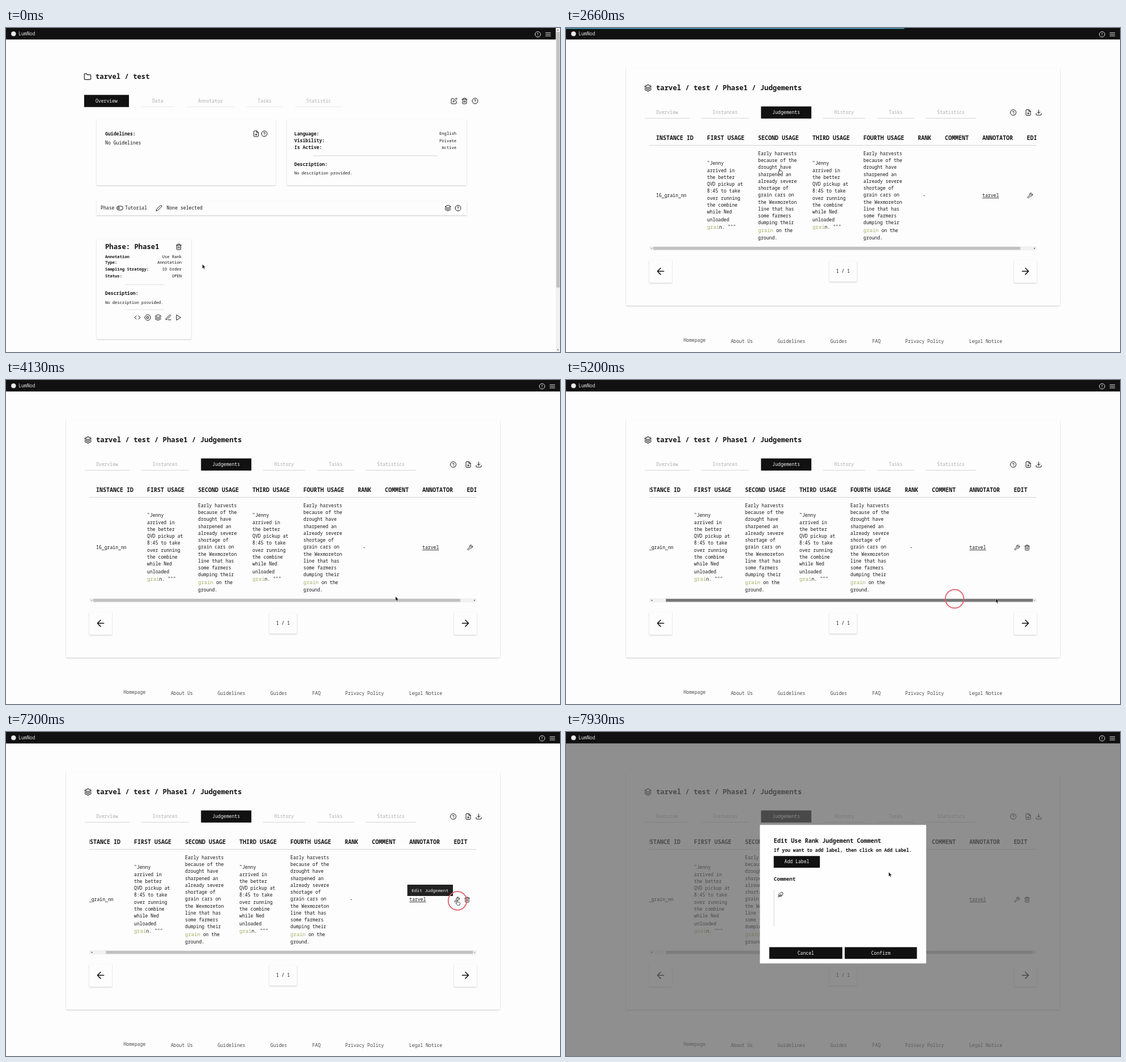
An HTML page that plays this animation: 978 px wide and 573 px high, repeating every 8 s.

```html
<!DOCTYPE html>
<html lang="en">
<head>
<meta charset="utf-8">
<title>Judgement editing</title>
<style>
html, body { margin: 0; width: 100%; height: 100%; overflow: hidden; background: #fdfdfd; }
svg { display: block; width: 978px; height: 573px; font-family: "Noto Sans Mono", "DejaVu Sans Mono", monospace; }
.card { fill: #fdfdfd; filter: drop-shadow(0 1.5px 1.2px #0003); }
.icon { fill: none; stroke-width: 2; stroke-linecap: round; stroke-linejoin: round; }
</style>
</head>
<body>
<svg id="stage" viewBox="0 0 978 573"></svg>
<script>
const INK = '#141414', DARK = '#111', PALE = '#f4f4f4', SMALL = 7.13, BASE = 8.15, MID = 10.2, BIG = 12.25;
const CIRCLE = 'M2 12a10 10 0 1 0 20 0a10 10 0 1 0-20 0';
const ICONS = {
  folder: 'M22 19a2 2 0 0 1-2 2H4a2 2 0 0 1-2-2V5a2 2 0 0 1 2-2h5l2 3h9a2 2 0 0 1 2 2z',
  layers: 'M12 2 2 7l10 5 10-5zM2 17l10 5 10-5M2 12l10 5 10-5',
  edit: 'M11 4H4a2 2 0 0 0-2 2v14a2 2 0 0 0 2 2h14a2 2 0 0 0 2-2v-7M18.5 2.5a2.1 2.1 0 0 1 3 3L12 15l-4 1 1-4z',
  trash: 'M3 6h18M19 6v14a2 2 0 0 1-2 2H7a2 2 0 0 1-2-2V6m3 0V4a2 2 0 0 1 2-2h4a2 2 0 0 1 2 2v2M10 11v6M14 11v6',
  help: CIRCLE + 'M9.1 9a3 3 0 0 1 5.8 1c0 2-3 3-3 3M12 17v.1',
  alert: CIRCLE + 'M12 7v5M12 16v.1',
  stop: CIRCLE + 'M9 9h6v6H9z',
  file: 'M14 2H6a2 2 0 0 0-2 2v16a2 2 0 0 0 2 2h12a2 2 0 0 0 2-2V8zM14 2v6h6M12 18v-6M9 15h6',
  menu: 'M3 12h18M3 6h18M3 18h18',
  download: 'M21 15v4a2 2 0 0 1-2 2H5a2 2 0 0 1-2-2v-4M7 10l5 5 5-5M12 15V3',
  code: 'M16 18l6-6-6-6M8 6l-6 6 6 6',
  pencil: 'M17 3a2.8 2.8 0 1 1 4 4L7.5 20.5 2 22l1.5-5.5z',
  write: 'M12 20h9M16.5 3.5a2.1 2.1 0 0 1 3 3L7 19l-4 1 1-4z',
  play: 'M5 3l14 9-14 9z',
  toggle: 'M8 5h8a7 7 0 0 1 0 14H8a7 7 0 0 1 0-14M5 12a3 3 0 1 0 6 0a3 3 0 1 0-6 0',
  wrench: 'M14.7 6.3a1 1 0 0 0 0 1.4l1.6 1.6a1 1 0 0 0 1.4 0l3.8-3.8a6 6 0 0 1-8 8l-6.9 6.9a2.1 2.1 0 0 1-3-3l6.9-6.9a6 6 0 0 1 8-8l-3.8 3.8z',
  feather: 'M20.2 12.2a6 6 0 0 0-8.5-8.5L5 10.5V19h8.5zM16 8L2 22M17.5 15H9',
  left: 'M19 12H5M12 19l-7-7 7-7',
  right: 'M5 12h14M12 5l7 7-7 7'
};

// Every y is the vertical centre of what is drawn.
const text = (x, y, s, size = BASE, weight = 500, fill = INK, anchor = 'start', extra = '') =>
  `<text x="${x}" y="${y + size * .35}" font-size="${size}" font-weight="${weight}" fill="${fill}" text-anchor="${anchor}" ${extra}>${s}</text>`;
const bold = (x, y, s, size = BASE) => text(x, y, s, size, 700);
const mid = (x, y, s, fill = INK) => text(x, y, s, BASE, 500, fill, 'middle');
const end = (x, y, s) => text(x, y, s, SMALL, 400, INK, 'end');
const rect = (x, y, w, h, fill, extra = '') => `<rect x="${x}" y="${y}" width="${w}" height="${h}" fill="${fill}" ${extra}/>`;
const card = (x, y, w, h) => rect(x, y, w, h, '#fdfdfd', 'class="card"');
const rule = (x, y, w, fill = '#d4d4d4') => rect(x, y - .5, w, 1, fill);
const icon = (name, x, y, k = .5, color = INK) =>
  `<path class="icon" stroke="${color}" d="${ICONS[name]}" transform="translate(${x - 12 * k} ${y - 12 * k}) scale(${k})"/>`;
const group = (id, body, extra = '') => `<g id="${id}" ${extra}>${body}</g>`;
const tri = (id, x, y, dx, dy) =>
  `<path id="${id}" fill="#505050" d="M${x + dx} ${y + dy}L${x - dx - dy} ${y - dy - dx}L${x - dx + dy} ${y - dy + dx}z"/>`;

function tabs(y, active, list, line) {
  return list.map(([name, cx]) => {
    const w = name.length * 4.89 + 40, x = cx - w / 2;
    return name == active
      ? rect(x, y - 10.5, w, 21.5, DARK) + mid(cx, y, name, PALE)
      : rule(x, y + 10.5, w, line) + mid(cx, y, name, '#adadad');
  }).join('');
}

const footer = [['Homepage', 227], ['About Us', 310.5], ['Guidelines', 398], ['Guides', 481.5], ['FAQ', 548],
  ['Privacy Policy', 633], ['Legal Notice', 741]].map(([s, x], i) => mid(x, i ? 554.5 : 552.5, s, '#4a4a4a')).join('');

const project = icon('folder', 144, 86, .57) + bold(158, 86, 'tarvel / test', BIG) +
  tabs(128.8, 'Overview', [['Overview', 177.5], ['Data', 268], ['Annotator', 361], ['Tasks', 456.5], ['Statistic', 552]], '#ececec') +
  icon('edit', 791, 129) + icon('trash', 809.5, 129) + icon('help', 828, 129) +
  card(160, 162, 316, 116) + bold(175, 187, 'Guidelines:') + text(175, 203, 'No Guidelines') +
  icon('file', 441.5, 187) + icon('help', 456, 187) +
  card(496, 162, 317, 116) +
  [['Language:', 'English'], ['Visibility:', 'Private'], ['Is Active:', 'Active']]
    .map(([a, b], i) => text(509, 187 + 12.2 * i, a, BASE, 600) + end(795, 187 + 12.2 * i, b)).join('') +
  rule(542, 226, 220) + text(509, 241, 'Description:', BASE, 600) + text(509, 256.5, 'No description provided.', SMALL, 400) +
  card(160, 306, 653, 25) + text(167, 318.5, 'Phase') + icon('toggle', 201, 318.5) + text(210, 318.5, 'Tutorial') +
  icon('pencil', 270, 318.5) + text(283.5, 318.5, 'None selected') + icon('layers', 780, 318.5) + icon('help', 798, 318.5) +
  card(160, 374, 167, 176) + bold(175, 387, 'Phase: Phase1', BIG) + icon('trash', 305, 387) +
  [['Annotation', 'Use Rank', 404.5], ['Type:', 'Annotation', 414.5], ['Sampling Strategy:', 'ID Order', 427], ['Status:', 'OPEN', 439]]
    .map(([a, b, y]) => text(175, y, a, SMALL, 600) + end(310, y, b)).join('') +
  rule(210, 454, 69, '#e2e2e2') + text(175, 469.5, 'Description:', BASE, 600) + text(175, 485.5, 'No description provided.', SMALL, 400) +
  rule(210, 498, 69, '#e2e2e2') +
  ['code', 'stop', 'layers', 'write', 'play'].map((n, i) => icon(n, 232 + 18.2 * i, 512)).join('') +
  rect(970.5, 0, 8, 573, '#f1f1f1') + rect(971.5, 7, 6, 452, '#c1c1c1') +
  tri('up', 974.3, 3.5, 0, -1.3) + tri('down', 974.3, 569.5, 0, 1.3);

const phaseTabs = [['Overview', 178.5], ['Instances', 281], ['Judgements', 388.7], ['History', 491], ['Tasks', 582], ['Statistics', 679.5]];
const phase = card(106, 163, 766, 235) + icon('layers', 144.7, 200.5, .57) + bold(159, 200.5, 'tarvel / test / Phase1', BIG) +
  tabs(243.7, 'Overview', phaseTabs) + icon('help', 834.3, 244) + rect(0, 253.7, 0, 1, '#888', 'id="hover"') +
  text(489, 300.5, 'Currently no overview available', 15.3, 700, INK, 'middle') +
  text(489, 333.5, 'Please select a tab to view the data, history or statistic of this phase.', MID, 700, INK, 'middle') + footer;

const tag = s => `<tspan fill="#a3ad62" font-size="9">${s}</tspan>`;
const cellA = ['"Jenny', 'arrived in', 'the better', 'QVD pickup at', '8:45 to take', 'over running', 'the combine', 'while Ned', 'unloaded', tag('grai') + 'n. """'];
const cellB = ['Early harvests', 'because of the', 'drought have', 'sharpened an', 'already severe', 'shortage of', 'grain cars on',
  'the Wexmoreton', 'line that has', 'some farmers', 'dumping their', tag('grain') + ' on the', 'ground.'];
const cell = (x, y, lines, late) => lines.map((s, i) => text(x, y + 12.25 * i + Math.max(0, i - late + 1) * 1.3, s)).join('');
const table = [['INSTANCE ID', 159], ['FIRST USAGE', 249], ['SECOND USAGE', 339], ['THIRD USAGE', 435], ['FOURTH USAGE', 525],
  ['RANK', 621], ['COMMENT', 669], ['ANNOTATOR', 735], ['EDIT', 813.5]].map(([s, x]) => bold(x, 194, s, 10)).join('') +
  text(159, 296.5, '16_grain_nn') + cell(249, 239.5, cellA, 8) + cell(435, 239.5, cellA, 8) +
  cell(339, 222, cellB, 11) + cell(525, 222, cellB, 11) + text(630, 296, '-') +
  text(735, 296.5, 'tarvel', BASE, 500, INK, 'start', 'text-decoration="underline"') + icon('wrench', 819, 296.5, .46) + icon('trash', 837, 296.5, .46);

const judgements = card(106, 70, 766, 421) + icon('layers', 144.7, 106, .57) + bold(159, 106, 'tarvel / test / Phase1 / Judgements', BIG) +
  tabs(149.2, 'Judgements', phaseTabs) + icon('help', 789.5, 149.5) + icon('file', 816, 149.5) + icon('download', 834.5, 149.5) +
  rule(147, 207.5, 684) + `<g clip-path="url(#window)">${group('table', table)}</g>` +
  rect(147, 386, 684, 7.5, '#f1f1f1') + rect(154, 387, 648, 5.3, '#c1c1c1', 'id="thumb"') +
  tri('toLeft', 151, 389.7, -1.3, 0) + tri('toRight', 827.5, 389.7, 1.3, 0) +
  card(147, 411, 40, 39.5) + icon('left', 167, 430.3, .8) + card(465, 413, 48.5, 35.5) + mid(489, 430.3, '1 / 1') +
  card(791, 411, 40, 39.5) + icon('right', 811, 430.3, .8) + footer;

const tooltip = rect(708.5, 270, 80.5, 20, '#222') + text(748.5, 280, 'Edit Judgement', 7.75, 500, PALE, 'middle');

const button = (x, y, w, s) => rect(x, y, w, 20.7, DARK) + mid(x + w / 2, y + 10.3, s, PALE);
const modal = rect(0, 20, 978, 553, '#616161', 'opacity=".7"') + rect(342.3, 164.3, 293.5, 245, '#fefefe') +
  bold(366.7, 192, 'Edit Use Rank Judgement Comment', MID) + bold(366.7, 209.5, 'If you want to add label, then click on Add Label.') +
  button(366.7, 219.3, 81.5, 'Add Label') + bold(366.7, 259.3, 'Comment', 9.17) +
  rect(366.7, 279, 1, 65, '#d4d4d4') + icon('feather', 378.7, 287.7, .44) +
  button(358.8, 380.5, 129, 'Cancel') + button(492, 380.5, 127.5, 'Confirm');

const nav = rect(0, 0, 978, 20.3, DARK) + '<circle cx="13.3" cy="10.3" r="4.3" fill="#e8e8e8"/>' + text(22, 10.3, 'LumNod', BASE, 500, '#e8e8e8') +
  group('menu', icon('alert', 946.3, 11.2, .48, '#e8e8e8') + icon('menu', 964.5, 11.2, .48, '#e8e8e8'));

const pointer = group('arrow', '<path fill="#111" stroke="#fff" stroke-width=".6" d="M0 0v8.3l1.9-1.7 1.3 2.9 1.4-.6-1.3-2.8h2.6z"/>') +
  group('hand', '<path fill="#fff" stroke="#222" stroke-width=".8" stroke-linejoin="round" d="M-.7 5.6V.7q.7-1 1.4 0v2.8l3.6.8q.9.3.8 1.4l-.6 3.6H.2L-2.7 6q.6-1.2 2 0z"/>');

document.getElementById('stage').innerHTML = '<clipPath id="window"><path d="M147 170h684v216H147z"/></clipPath>' + nav +
  group('project', project) + group('phase', phase) + group('judgements', judgements) + group('tooltip', tooltip) + group('modal', modal) +
  rect(0, 0, 0, 1.4, '#4fb3d9', 'id="bar"') +
  '<circle id="ring" r="16.3" fill="none" stroke="#e0606a" stroke-width="1.8"/>' + group('pointer', pointer);

const el = id => document.getElementById(id);
const set = (id, attrs) => { for (const k in attrs) el(id).setAttribute(k, attrs[k]); };
const show = (id, on) => { el(id).style.display = on ? '' : 'none'; };
const clamp = v => Math.min(1, Math.max(0, v));

// Pointer path: time, x, y
const PATH = [[0, 346.5, 417.5], [200, 346.5, 417.5], [460, 283.5, 432], [1130, 283.5, 432], [1400, 290, 313], [1730, 303, 246],
  [1800, 305, 246], [2200, 377, 249], [3240, 377, 249], [3800, 687.5, 382.5], [4430, 687.5, 382.5], [4530, 686, 387], [4730, 686, 387],
  [5200, 758.5, 386], [5270, 758.5, 386], [5530, 764, 333], [5600, 765, 331], [6250, 796.5, 297], [7420, 796.5, 297], [7930, 569.5, 247.5], [8000, 569.5, 247.5]];
// Clicks: start, end, x, y
const CLICKS = [[730, 930, 283.5, 432], [2400, 2600, 377, 249], [4730, 5330, 686, 387], [7000, 7260, 797, 298.5]];
// Page loads: start, end of the progress bar
const LOADS = [[930, 1250], [2490, 2770]];

function pointerAt(t) {
  const i = Math.max(1, PATH.findIndex(p => p[0] > t)), [t0, x0, y0] = PATH[i - 1], [t1, x1, y1] = PATH[i];
  const u = (t - t0) / (t1 - t0);
  const k = t0 == 1130 || t0 == 1400 ? u : u * u * (3 - 2 * u);
  return [x0 + (x1 - x0) * k, y0 + (y1 - y0) * k];
}

function draw(t) {
  const [x, y] = pointerAt(t);
  const page = t < 1070 ? 'project' : t < 2600 ? 'phase' : 'judgements';
  for (const p of ['project', 'phase', 'judgements']) show(p, p == page);
  set('menu', { transform: `translate(${page == 'project' ? -7.5 : 0})` });

  const tab = page == 'phase' && t > 1650 && phaseTabs.slice(1, 3).find(([s, c]) => Math.abs(x - c) < s.length * 2.445 + 20);
  const w = tab ? tab[0].length * 4.89 + 40 : 0;
  set('hover', { x: tab ? tab[1] - w / 2 : 0, width: w });

  const drag = t < 4730 ? 0 : t < 5200 ? clamp((x - 686) / 22.3) : 1;
  set('table', { transform: `translate(${-23 * drag})` });
  set('thumb', { x: 154 + 22.3 * drag, fill: t < 4460 || t > 5400 ? '#c1c1c1' : t < 4730 ? '#a8a8a8' : '#787878' });
  set('toLeft', { fill: drag ? '#505050' : '#a3a3a3' });
  set('toRight', { fill: drag < 1 ? '#505050' : '#a3a3a3' });

  show('tooltip', t >= 6000 && t < 7260);
  show('modal', t >= 7260);

  const load = LOADS.find(([a, b]) => t >= a && t < b + 200);
  set('bar', { width: load ? 978 * clamp((t - load[0]) / (load[1] - load[0])) : 0, opacity: load ? 1 - clamp((t - load[1]) / 200) : 0 });

  const click = CLICKS.find(([a, b]) => t >= a && t < b);
  show('ring', click);
  if (click) set('ring', { cx: click[2], cy: click[3] });

  const hand = t > 330 && t < 1130 || tab || t >= 2600 && t < 3260 || t >= 6000 && t < 7440;
  show('hand', hand);
  show('arrow', !hand);
  set('pointer', { transform: `translate(${x} ${y})` });
}

function tick() {
  draw(performance.now() % 8000);
  requestAnimationFrame(tick);
}
tick();
</script>
</body>
</html>
```
